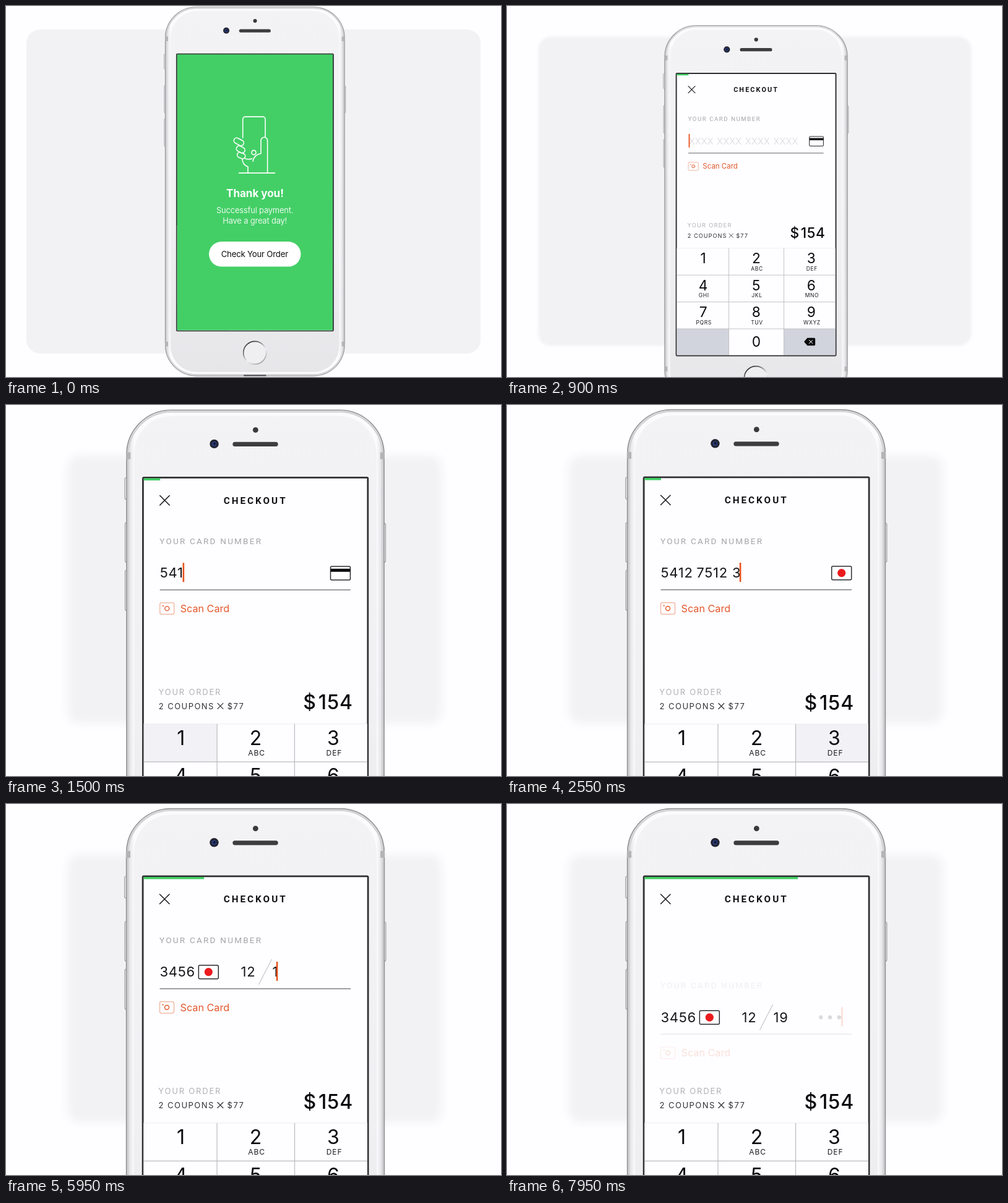
An HTML page that plays this animation: 800 px wide and 600 px high, repeating every 8 s.

```html
<!DOCTYPE html>
<html lang="en">
<head>
<meta charset="utf-8">
<title>Card checkout</title>
<style>
html, body { margin: 0; width: 100%; height: 100%; overflow: hidden; background: #fefdff; }
svg { display: block; width: 100vw; height: 100vh; font-family: Inter, Roboto, "Liberation Sans", sans-serif; }
.line { fill: none; stroke-linecap: round; stroke-linejoin: round; }
.num { font-size: 22px; letter-spacing: .7px; fill: #161618; }
.hint { font-size: 21px; font-weight: 300; letter-spacing: .2px; fill: #d9d8dc; }
.digit { font-size: 32px; text-anchor: middle; fill: #0c0c0e; }
.abc { font-size: 12px; letter-spacing: .9px; text-anchor: middle; fill: #1c1c1e; }
.order { font-size: 13px; letter-spacing: 1.45px; fill: #313134; }
.total { font-size: 32px; font-weight: 500; letter-spacing: .8px; fill: #09090b; }
.mid { text-anchor: middle; }
</style>
</head>
<body>
<svg viewBox="0 0 800 600">
  <defs>
    <filter id="soft" x="-20%" y="-20%" width="140%" height="140%"><feGaussianBlur id="blur" stdDeviation="0"/></filter>
    <linearGradient id="face" x1="0" y1="0" x2="0" y2="1">
      <stop offset="0" stop-color="#f3f2f4"/><stop offset=".6" stop-color="#f0eff2"/><stop offset="1" stop-color="#e6e6e9"/>
    </linearGradient>
    <linearGradient id="rim" x1="0" y1="0" x2="1" y2="0">
      <stop offset="0" stop-color="#c9c9cc"/><stop offset=".012" stop-color="#e6e6e8"/><stop offset=".03" stop-color="#fbfafc"/>
      <stop offset=".97" stop-color="#fbfafc"/><stop offset=".988" stop-color="#e6e6e8"/><stop offset="1" stop-color="#c9c9cc"/>
    </linearGradient>
    <linearGradient id="ring" x1=".15" y1="0" x2=".85" y2="1">
      <stop offset="0" stop-color="#1d1d1f"/><stop offset=".3" stop-color="#77777a"/><stop offset=".6" stop-color="#f4f4f6"/><stop offset="1" stop-color="#8b8b8f"/>
    </linearGradient>
    <clipPath id="screen"><rect x="222.3" y="118" width="361.6" height="641.8"/></clipPath>
    <clipPath id="entry"><rect x="246.5" y="240" width="312" height="58"/></clipPath>
    <clipPath id="greenArea"><rect id="greenClip" x="221" y="117.5" width="364" height="643"/></clipPath>
  </defs>

  <rect width="800" height="600" fill="#fefdff"/>
  <rect id="backdrop" fill="#f2f1f3" filter="url(#soft)"/>

  <g id="phone">
    <g fill="#f6f5f7" stroke="#98989b" stroke-width="1.2">
      <rect x="191.8" y="117" width="6" height="35" rx="2"/>
      <rect x="192.2" y="190" width="6" height="64" rx="2"/>
      <rect x="192.2" y="267" width="6" height="65" rx="2"/>
      <rect x="608" y="191" width="5.8" height="63" rx="2"/>
    </g>
    <rect x="194.6" y="7.6" width="416.8" height="858" rx="72" fill="url(#rim)" stroke="#929295" stroke-width="1.6"/>
    <rect x="197.4" y="10.2" width="411.2" height="852.8" rx="69" fill="none" stroke="#d2d2d5" stroke-width="2.6"/>
    <g fill="#b4b4b7">
      <rect x="194" y="76" width="7" height="11"/><rect x="605" y="76" width="7" height="11"/>
      <rect x="194" y="786" width="7" height="11"/><rect x="605" y="786" width="7" height="11"/>
    </g>
    <rect x="207" y="17" width="392" height="840" rx="61" fill="url(#face)"/>
    <path d="M377 865H429" stroke="#55555a" stroke-width="3"/>
    <circle cx="403.3" cy="39.7" r="4.4" fill="#39393b"/>
    <circle cx="336.4" cy="62.3" r="7.2" fill="#222431"/>
    <circle cx="336.4" cy="62.3" r="3.9" fill="#273b78"/>
    <circle cx="336.8" cy="62" r="1.9" fill="#11152a"/>
    <rect x="366.3" y="59.2" width="73.4" height="7.2" rx="3.6" fill="#3d3d3f"/>
    <circle cx="402.8" cy="812" r="26.6" fill="#efeff1" stroke="url(#ring)" stroke-width="2.4"/>

    <rect x="221.1" y="116.8" width="364" height="644.2" rx="1.5" fill="#fefdff" stroke="#303032" stroke-width="2.8"/>
    <g clip-path="url(#screen)">
      <path class="line" d="M248.5 146L264 161.5M264 146L248.5 161.5" stroke="#161618" stroke-width="1.5"/>
      <text class="mid" x="403.2" y="159.3" font-family="Roboto, Inter, sans-serif" font-size="15.3" font-weight="700" letter-spacing="3" fill="#111113">CHECKOUT</text>

      <g id="field">
        <g class="fade">
          <text x="248" y="225" font-family="Roboto, Inter, sans-serif" font-size="13.5" letter-spacing="2.25" fill="#a5a4a8">YOUR CARD NUMBER</text>
          <path d="M248.5 298.8H557" stroke="#828185" stroke-width="1.6"/>
          <g class="line" stroke="#e4592b" stroke-width="1.4">
            <rect x="248.5" y="319.7" width="23" height="18.6" rx="2.5" stroke="#f2b19a" stroke-width="1.3"/>
            <circle cx="260" cy="329" r="3.5"/>
            <path d="M253.6 324.6h.1" stroke-width="2.2"/>
          </g>
          <text x="281.5" y="334.8" font-size="16.2" fill="#e4592b">Scan Card</text>
        </g>
        <g clip-path="url(#entry)"><g id="hints"></g><g id="groups"></g></g>
        <g id="card">
          <rect x="524.7" y="260.8" width="32" height="22" rx="2" fill="#fefdff" stroke="#2b2b30" stroke-width="1.5"/>
          <rect id="stripe" x="525" y="264.5" width="31.4" height="5" fill="#0b0b0d"/>
          <circle id="brand" cx="540.7" cy="271.6" r="6.6" fill="#eb1a1e"/>
          <path id="tick" class="line" d="M534.5 271.5l4.5 4.3l7.6-8" stroke="#39393c" stroke-width="1.5" pathLength="1" stroke-dasharray="1 2"/>
        </g>
        <path id="slash" d="M408.5 292L429.5 251" stroke="#c9c8cc" stroke-width="1.3" pathLength="1" stroke-dasharray="1 2"/>
        <text id="mm" class="hint" x="380" y="279">MM</text>
        <text id="yy" class="hint" x="431" y="279">YY</text>
        <text id="month" class="num" x="379.5" y="279.2"></text>
        <text id="year" class="num" x="430.5" y="279.2"></text>
        <g class="fade">
          <g id="dots" fill="#2a2a2d"><circle cx="507.3" cy="271.6" r="3.2"/><circle cx="522" cy="271.6" r="3.2"/><circle cx="536.8" cy="271.6" r="3.2"/></g>
          <rect id="cursor" y="255" width="2.6" height="31" fill="#e9531f"/>
        </g>
      </g>

      <text x="246.3" y="469" font-size="13" letter-spacing="1.8" fill="#b2b1b5">YOUR ORDER</text>
      <text class="order" x="246.6" y="492">2 COUPONS</text>
      <path class="line" d="M341.8 482.5l9 9m0-9l-9 9" stroke="#313134" stroke-width="1.2"/>
      <text class="order" x="357.6" y="492">$77</text>
      <text class="total" x="480.5" y="492.5">$</text>
      <text class="total" x="561" y="492.5" text-anchor="end">154</text>

      <g id="pad"></g>

      <g clip-path="url(#greenArea)">
        <rect x="221" y="117" width="365" height="645" fill="#43cf66"/>
        <g id="thanks" transform="translate(403 116) scale(1.4388) translate(-402.3 -77)" fill="#fff">
          <g class="line" stroke="#fff" stroke-width="1.6">
            <path d="M382.7 213V183a4 4 0 0 1 4-4H415a4 4 0 0 1 4 4V212"/>
            <rect x="367.8" y="215" width="17" height="9" rx="4.5" transform="rotate(28 376.3 219.5)"/>
            <rect x="372" y="227.3" width="14.5" height="9" rx="4.5" transform="rotate(28 379.2 231.8)"/>
            <rect x="373.4" y="237.5" width="13.5" height="8.4" rx="4.2" transform="rotate(24 380 241.7)"/>
            <path d="M382 247.5q0 9 9 12.5V270M386.5 246.5q3 2 11 .5M399 251q2-11 13-12.5V217.5a5.3 5.3 0 0 1 10.6 0V270M376.5 270H434.5"/>
            <circle cx="400.5" cy="236.8" r="3.5"/>
          </g>
          <text class="mid" x="402.5" y="308.6" font-size="17" font-weight="700">Thank you!</text>
          <g class="mid" font-size="12.9" letter-spacing="-.16" fill-opacity=".88">
            <text x="402.2" y="334.5">Successful payment.</text>
            <text x="402.2" y="351.8">Have a great day!</text>
          </g>
          <rect x="328" y="381" width="148.5" height="40.5" rx="20.25"/>
          <text class="mid" x="401.8" y="406" font-size="13.2" letter-spacing="-.2" fill="#0e0e10">Check Your Order</text>
        </g>
      </g>
      <rect id="bar" x="221.5" y="117.5" height="4" fill="#3fcf62"/>
    </g>
  </g>
</svg>
<script>
const LOOP = 8000;
const $ = id => document.getElementById(id);
const set = (el, attrs) => { for (const k in attrs) el.setAttribute(k, attrs[k]); };
const add = (parent, tag, attrs, text) => {
  const el = document.createElementNS('http://www.w3.org/2000/svg', tag);
  set(el, attrs);
  if (text) el.textContent = text;
  return parent.appendChild(el);
};
const seg = (t, a, b) => Math.min(1, Math.max(0, (t - a) / (b - a)));
const inOut = p => p < .5 ? 4 * p ** 3 : 1 - 4 * (1 - p) ** 3;
const out = p => 1 - (1 - p) ** 3;
const move = (t, a, b) => inOut(seg(t, a, b));
const lerp = (a, b, p) => a + (b - a) * p;

// Card number
const GROUPS = ['5412', '7512', '3412', '3456'];
const LEFT = 248.5, PITCH = 57.8;
const groups = GROUPS.map((g, i) => add($('groups'), 'text', { class: 'num', x: LEFT + PITCH * i, y: 279.2 }));
GROUPS.forEach((g, i) => add($('hints'), 'text', { class: 'hint', x: LEFT + 1 + 64.4 * i, y: 279 }, 'XXXX'));

// Key presses and the cursor place each one leads to
const presses = [...GROUPS.join('')].map((key, i) => ({
  key,
  at: i < 9 ? 1110 + 170 * i : 2470 + 140 * (i - 8),
  x: LEFT + PITCH * Math.floor(i / 4) + 12.6 * (i % 4 + 1)
}));
const MONTH = [5200, 5340], YEAR = [5910, 6260], CODE = [6880, 7060, 7240];
const stops = [
  { at: 0, x: 250.2 }, ...presses, { at: 4000, x: 380 },
  { at: MONTH[0], x: 391 }, { at: MONTH[1], x: 406 },
  { at: YEAR[0], x: 438 }, { at: YEAR[1], x: 456 }, { at: 6650, x: 502 },
  ...CODE.map((at, i) => ({ at, x: 511.5 + 14.8 * i }))
];
presses.push({ key: '1', at: MONTH[0] }, { key: '2', at: MONTH[1] }, { key: '1', at: YEAR[0] - 70 }, { key: '9', at: YEAR[1] });
const typed = (times, t) => times.filter(at => t >= at).length;

// Keypad
const COLS = [221, 341, 466.5, 586], TOP = 516, ROW = 61.3;
const LETTERS = ['', 'ABC', 'DEF', 'GHI', 'JKL', 'MNO', 'PQRS', 'TUV', 'WXYZ'];
const keys = {};
const pad = $('pad');
for (let i = 0; i < 12; i++) {
  const c = i % 3, y = TOP + ROW * Math.floor(i / 3);
  const cx = [282.5, 403.5, 529][c];
  const name = i < 9 ? String(i + 1) : i === 10 ? '0' : '';
  const cell = add(pad, 'rect', { x: COLS[c], y, width: COLS[c + 1] - COLS[c], height: ROW, fill: name ? '#fefdff' : '#d1d4dc' });
  if (!name) continue;
  keys[name] = cell;
  add(pad, 'text', { class: 'digit', x: cx, y: y + (i < 9 ? 34.3 : 41.5) }, name);
  if (LETTERS[i]) add(pad, 'text', { class: 'abc', x: cx + 1.6, y: y + 51.2 }, LETTERS[i]);
}
add(pad, 'path', { d: 'M221 516H586', stroke: '#ecebee' });
add(pad, 'path', {
  d: [1, 2, 3].map(r => `M221 ${TOP + ROW * r}H586`).join('') + 'M341 516V762M466.5 516V762',
  stroke: '#bbbabf', 'stroke-width': 1.2, fill: 'none'
});
add(pad, 'path', { d: 'M512.5 729.5l7.5-8.8h15.5a2.5 2.5 0 0 1 2.5 2.5v12.6a2.5 2.5 0 0 1-2.5 2.5h-15.5z', fill: '#0b0b0d' });
add(pad, 'path', { class: 'line', d: 'M524 725.5l8 8m0-8l-8 8', stroke: '#fff', 'stroke-width': 1.4 });

function cursorX(t) {
  let x = stops[0].x;
  for (const s of stops) if (t >= s.at) x = lerp(x, s.x, out(.6 + .4 * seg(t, s.at, s.at + 90)));
  return x;
}

function camera(t) {
  const p = move(t, 476, 1532);
  const s = lerp(.695, 1, move(t, 700, 1600));
  $('phone').setAttribute('transform',
    `translate(${lerp(402.3, 403, p)} ${lerp(299.5, 436, p)}) scale(${s}) translate(-403 -436)`);
  const w = lerp(734, 604, p), h = lerp(524, 432, p);
  set($('backdrop'), { x: lerp(400, 402, p) - w / 2, y: lerp(300, 298.5, p) - h / 2, width: w, height: h, rx: lerp(22, 18, p) });
  $('blur').setAttribute('stdDeviation', 7.5 * p);
}

function progress(t) {
  $('greenClip').setAttribute('height', lerp(643, 0, move(t, 100, 620)));
  $('thanks').setAttribute('opacity', 1 - seg(t, 100, 350));
  const w = 363.5 - 336 * move(t, 520, 890)
    + 71 * out(seg(t, 3650, 4400))
    + 74 * out(seg(t, 6600, 7200))
    + 77 * out(seg(t, 7450, 8100));
  $('bar').setAttribute('width', w);
}

function entry(t) {
  const count = presses.slice(0, 16).filter(p => t >= p.at).length;
  const slide = move(t, 3540, 4080);
  groups.forEach((el, i) => {
    el.textContent = GROUPS[i].slice(0, Math.max(0, count - 4 * i));
    if (i < 3) el.setAttribute('opacity', 1 - seg(slide, 0, .8));
  });
  $('groups').setAttribute('transform', `translate(${-3 * PITCH * slide} 0)`);
  $('hints').setAttribute('opacity', count ? 0 : 1);

  $('card').setAttribute('transform', `translate(${-213.4 * slide} 0)`);
  const known = seg(t, 1780, 1950), check = seg(t, 3600, 3750), back = seg(t, 4550, 4850);
  $('stripe').setAttribute('opacity', 1 - known);
  $('brand').setAttribute('opacity', known * (1 - check) + back);
  set($('tick'), { opacity: check > 0 ? 1 - seg(t, 4400, 4600) : 0, 'stroke-dashoffset': 1 - seg(t, 3700, 3950) });

  const drawn = move(t, 4080, 4700);
  set($('slash'), { 'stroke-dashoffset': 1 - drawn, opacity: drawn > 0 ? 1 : 0 });
  $('mm').setAttribute('opacity', t < MONTH[0] ? seg(t, 4350, 4700) : 0);
  $('yy').setAttribute('opacity', t < YEAR[0] ? seg(t, 5400, 5800) : 0);
  $('month').textContent = '12'.slice(0, typed(MONTH, t));
  $('year').textContent = '19'.slice(0, typed(YEAR, t));
  [...$('dots').children].forEach((dot, i) => dot.setAttribute('opacity', seg(t, CODE[i], CODE[i] + 60)));

  set($('cursor'), { x: cursorX(t) - .9, opacity: t > 3540 && t < 4350 ? 0 : 1 });
  $('field').setAttribute('transform', `translate(0 ${73.5 * move(t, 7450, 7980)})`);
  for (const el of document.querySelectorAll('.fade')) el.setAttribute('opacity', 1 - seg(t, 7450, 8050));
}

function keypad(t) {
  for (const k in keys) {
    const down = presses.some(p => p.key === k && t >= p.at && t < p.at + 110);
    keys[k].setAttribute('fill', down ? '#f2f1f5' : '#fefdff');
  }
}

function draw(t) {
  camera(t);
  progress(t);
  entry(t);
  keypad(t);
}

function tick() {
  draw(performance.now() % LOOP);
  requestAnimationFrame(tick);
}
tick();
</script>
</body>
</html>
```
